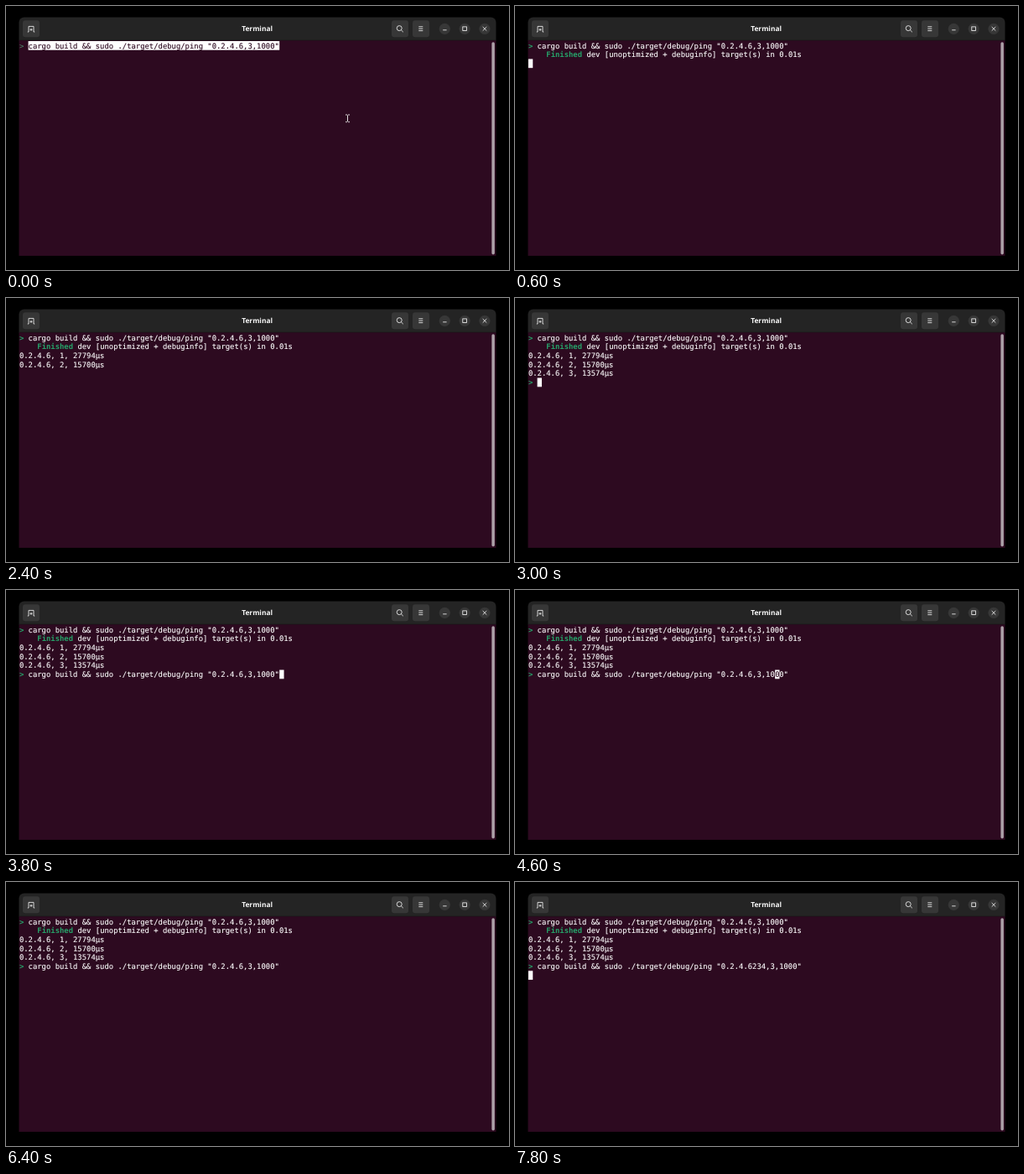
Animation, 600 px wide and 316 px high, one loop 8000 ms. Source, as an HTML page:

```html
<!DOCTYPE html>
<html lang="en">
<head>
<meta charset="utf-8">
<title>Terminal</title>
<style>
  html, body { margin: 0; width: 100%; height: 100%; overflow: hidden; background: #000; }
  svg { display: block; width: 100%; height: 100%; }
  text { text-rendering: geometricPrecision; }
  #screen text {
    font: 8.89px "DejaVu Sans Mono", monospace; white-space: pre;
    fill: #fff; stroke: #fff; stroke-width: .12px;
  }
  #screen .green { fill: #26a269; stroke: none; font-weight: bold; }
  #screen .dim { fill: #4f8a6c; stroke: none; }
  #screen .dark { fill: #2d0a20; stroke: #2d0a20; }
  .title { font: bold 8.4px "Noto Sans", "Open Sans", sans-serif; fill: #f7f7f7; text-anchor: middle; }
  .button { fill: #373737; }
  .icon { fill: none; stroke: #f2f2f2; stroke-width: .85; }
</style>
</head>
<body>
<svg viewBox="0 0 600 316">
  <path fill="#242424" d="M15.5 41.5V19.5a6 6 0 0 1 6-6H578.5a6 6 0 0 1 6 6V41.5Z"/>
  <rect x="15.5" y="41" width="569" height="258" fill="#2d0a20"/>
  <rect x="15.5" y="40.7" width="569" height=".6" fill="#151515"/>
  <rect x="579.4" y="43.2" width="3.5" height="254.3" rx="1.75" fill="#aca1a8"/>

  <g class="button">
    <rect x="20" y="17.3" width="20" height="20" rx="3"/>
    <rect x="460" y="17.3" width="20" height="20" rx="3"/>
    <rect x="485" y="17.3" width="20" height="20" rx="3"/>
    <circle cx="523.3" cy="27.3" r="6.6"/>
    <circle cx="547.2" cy="27.3" r="6.6"/>
    <circle cx="571" cy="27.3" r="6.6"/>
  </g>
  <g class="icon">
    <path d="M25.8 31h1.2v-6.6h6V31h1.2M30 26.8v3M28.5 28.3h3"/>
    <circle cx="469.2" cy="26.6" r="3"/>
    <path d="M471.4 28.8l2.4 2.4"/>
    <path d="M492.3 24.8h5M492.3 27.2h5M492.3 29.6h5"/>
    <path d="M521.2 28.8h4.4"/>
    <rect x="544.8" y="24.9" width="4.6" height="4.6"/>
    <path d="M568.7 25l4.6 4.6M573.3 25l-4.6 4.6"/>
  </g>
  <text class="title" x="299.6" y="30.4">Terminal</text>

  <g id="screen"></g>
  <path id="pointer" fill="none" stroke="#e4dfe2"
    d="M405 130.2h1.6l.9.8.9-.8h1.6M405 138.8h1.6l.9-.8.9.8h1.6M407.5 131v7"/>
</svg>
<script>
const LOOP = 8000;
const LEFT = 15.9, TOP = 42, CELL_W = 5.35, CELL_H = 10.72;
const HOST = "0.2.4.6";
const command = (extra = "") => `cargo build && sudo ./target/debug/ping "${HOST}${extra},3,1000"`;
const replies = [[800, 27794], [1800, 15700], [2800, 13574]];

// [start time, row, column]; no column means the cursor is hidden
const cursorSteps = [
  [0], [400, 0, 58], [600, 2, 0], [800, 3, 0], [1200],
  [1800, 4, 0], [2400], [3000, 5, 2], [3600], [3800, 5, 58],
  [4400, 5, 57], [4600, 5, 55], [4800, 5, 54], [5000, 5, 53],
  [5400, 5, 52], [5600, 5, 51], [5800, 5, 50], [6400], [6600, 5, 50],
  [6800, 5, 52], [7000, 5, 53], [7600], [7800, 6, 0]
];

const screen = document.getElementById("screen");
const pointer = document.getElementById("pointer");

const escapeText = s => s.replace(/&/g, "&amp;").replace(/</g, "&lt;").replace(/>/g, "&gt;");
const write = (row, col, s, style = "") =>
  `<text class="${style}" x="${LEFT + col * CELL_W}" y="${TOP + row * CELL_H + 8.5}">${escapeText(s)}</text>`;
const block = (row, col, cells) =>
  `<rect x="${LEFT + col * CELL_W}" y="${TOP + row * CELL_H}" width="${cells * CELL_W}" height="${CELL_H}" fill="#fff"/>`;

function render(t) {
  const selected = t < 600;
  const first = command();
  let out = write(0, 0, ">", selected ? "dim" : "green");
  if (selected) out += block(0, 2, first.length);
  out += write(0, 2, first, selected ? "dark" : "");

  if (!selected) {
    out += write(1, 4, "Finished", "green");
    out += write(1, 13, "dev [unoptimized + debuginfo] target(s) in 0.01s");
  }
  replies.forEach(([start, micros], i) => {
    if (t >= start) out += write(2 + i, 0, `${HOST}, ${i + 1}, ${micros}µs`);
  });

  const typed = t < 6800 ? "" : t < 7000 ? "23" : "234";
  const second = t < 3800 ? "" : command(typed);
  if (t >= 2800) out += write(5, 0, ">", "green") + write(5, 2, second);

  const [, row, col] = cursorSteps.findLast(([start]) => t >= start);
  if (col !== undefined) {
    out += block(row, col, 1);
    const covered = row === 5 && second[col - 2];
    if (covered) out += write(row, col, covered, "dark");
  }
  screen.innerHTML = out;
  pointer.style.display = selected ? "" : "none";
}

let shown = -1;
function tick() {
  const t = performance.now() % LOOP;
  const step = Math.floor(t / 200);
  if (step !== shown) render(t);
  shown = step;
  requestAnimationFrame(tick);
}
tick();
</script>
</body>
</html>
```
